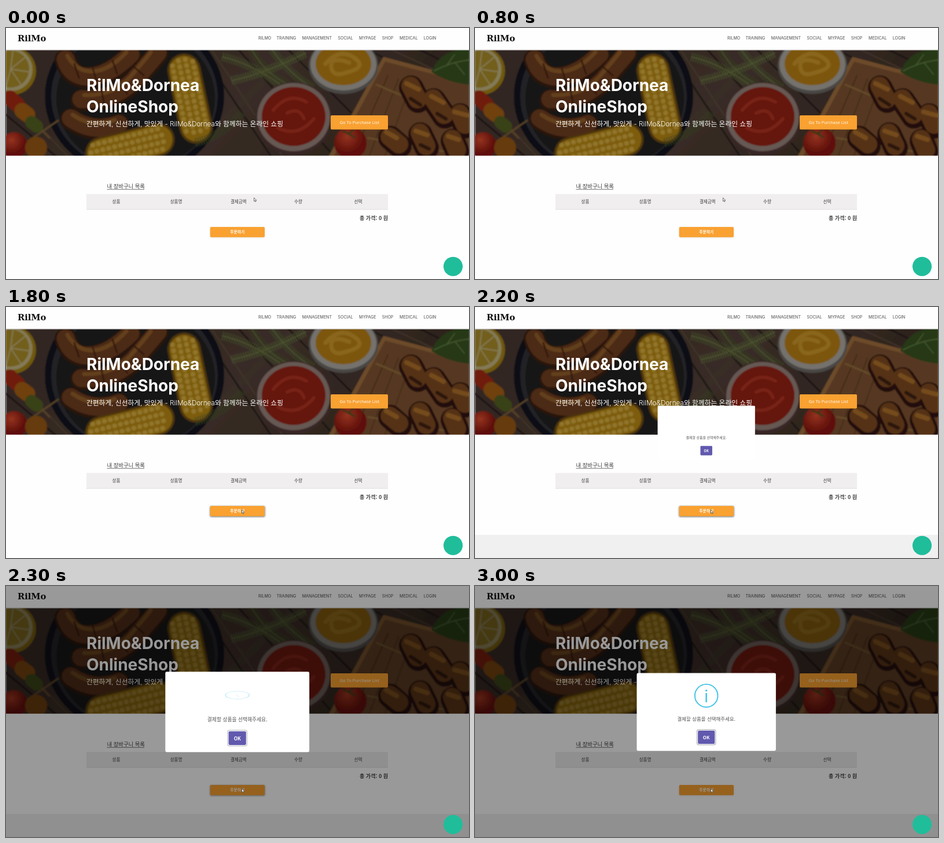
Write an HTML page that moves like this. It is 800x434 px and loops after 3.7 s.

```html
<!DOCTYPE html>
<html lang="ko">
<head>
<meta charset="utf-8">
<title>OnlineShop</title>
<style>
html, body { margin: 0; width: 100%; height: 100%; overflow: hidden; background: #fefefe; }
svg { display: block; }
text { font-family: "Noto Sans CJK KR", "Noto Sans CJK", sans-serif; fill: #3c3c3c; }
.mid { text-anchor: middle; }
.inter, #nav text { font-family: Inter, "Noto Sans CJK KR", "Noto Sans CJK", sans-serif; }
#nav text { font-size: 7px; font-weight: 500; fill: #666; }
#head text { font-size: 7.5px; font-weight: 500; }
.white, #hero text { fill: #fff; }
.line { fill: none; stroke-linecap: round; stroke-linejoin: round; }
</style>
</head>
<body>
<svg width="800" height="434" viewBox="0 0 800 434">
  <defs>
    <clipPath id="frame"><rect y="38.5" width="800" height="182.3"/></clipPath>
    <filter id="soft"><feGaussianBlur stdDeviation="1.4"/></filter>
    <filter id="haze"><feGaussianBlur stdDeviation=".9"/></filter>
    <radialGradient id="tomato" cx=".4" cy=".3"><stop stop-color="#ee5233"/><stop offset="1" stop-color="#98190f"/></radialGradient>
    <linearGradient id="wood" x2="1" y2=".25"><stop stop-color="#4d3c32"/><stop offset=".6" stop-color="#5a483c"/><stop offset="1" stop-color="#45352c"/></linearGradient>
    <g id="cob" class="line">
      <path d="M-50 0H50" stroke="#7c5510" stroke-width="58"/>
      <path d="M-50 0H50" stroke="#c9951c" stroke-width="50"/>
      <path d="M-62 -18H62M-68 -6H68M-68 6H68M-62 18H62" stroke="#e9bd45" stroke-width="8" stroke-dasharray=".5 10"/>
    </g>
  </defs>
  <rect width="800" height="434" fill="#fefefe"/>
  <rect id="footer" y="394" width="800" height="40" fill="#f1f0f0"/>

  <text x="20" y="23" style="font:bold 14.7px 'DejaVu Serif',serif;fill:#111">RilMo</text>
  <g id="nav"></g>
  <rect y="37.6" width="800" height="1" fill="#bbb"/>

  <g clip-path="url(#frame)">
    <g filter="url(#haze)">
      <rect y="30" width="800" height="200" fill="url(#wood)"/>
      <path class="line" d="M330 30L460 225M395 30L570 225M480 30L640 190M0 150L90 225M610 30L700 75M700 30L800 80" stroke="#2f241d" stroke-width="3"/>
      <path class="line" d="M350 30L480 225M520 110L580 170M650 30L800 100M20 130L110 225" stroke="#6a5444" stroke-width="2"/>
      <!-- lemon -->
      <circle cx="10" cy="74" r="42" fill="#b58d1c"/><circle cx="9" cy="72" r="37" fill="#d3c58a"/><circle cx="8" cy="71" r="32" fill="#b9992f"/>
      <path d="M8 71L34 50M8 71L41 76M8 71L26 98M8 71L0 102M8 71L12 39" stroke="#d3c58a" stroke-width="2"/>
      <!-- pan -->
      <ellipse cx="222" cy="118" rx="155" ry="140" fill="#1a1b1d"/>
      <ellipse cx="222" cy="118" rx="144" ry="129" fill="#38393b"/>
      <ellipse cx="224" cy="122" rx="137" ry="122" fill="#202022"/>
      <!-- sausages -->
      <g class="line">
        <path d="M103 55Q112 88 145 86T215 48M130 125Q190 128 225 88T262 45M112 158Q150 185 195 168" stroke="#3f1e10" stroke-width="38"/>
        <path d="M103 54Q112 86 145 84T215 46M130 123Q190 126 225 86T262 43M112 156Q150 183 195 166" stroke="#78421f" stroke-width="31"/>
        <path d="M106 48Q122 76 150 75T208 42M135 116Q186 118 216 83T250 42M115 150Q150 174 188 159" stroke="#a0652f" stroke-width="7"/>
        <path d="M118 62l8 24M150 70l7 23M184 56l8 23M165 108l5 24M195 96l15 18M222 68l16 14" stroke="#4b2411" stroke-width="2.5"/>
      </g>
      <use href="#cob" transform="translate(214 205) rotate(-14)"/>
      <use href="#cob" transform="translate(318 122) rotate(78)"/>
      <!-- vegetable skewers -->
      <g class="line">
        <path d="M-5 108L75 190M0 222L90 160" stroke="#8c6a3c" stroke-width="3"/>
        <path d="M7 121L20 133" stroke="#b52d18" stroke-width="26"/>
        <path d="M28 143L37 150" stroke="#b5681b" stroke-width="27"/>
        <path d="M44 163L53 170" stroke="#5c6b25" stroke-width="22"/>
      </g>
      <circle cx="14" cy="203" r="23" fill="url(#tomato)"/><circle cx="52" cy="207" r="19" fill="#a45f1b"/>
      <!-- rosemary -->
      <g fill="none" stroke-width="15" stroke-dasharray="1.5 2.8">
        <path d="M374 50Q440 65 510 126" stroke="#66793f"/><path d="M425 38Q450 82 490 98" stroke="#4d612f"/>
        <path d="M390 91Q450 78 518 43" stroke="#728348"/><path d="M460 38Q488 78 530 104" stroke="#5e733d"/>
        <path d="M328 198Q375 186 410 145" stroke="#4d612f"/>
      </g>
      <path class="line" d="M374 50Q440 65 510 126M425 38Q450 82 490 98M390 91Q450 78 518 43M460 38Q488 78 530 104" stroke="#80874f" stroke-width="1.5"/>
      <!-- board -->
      <path d="M652 50L810 92V230H555Z" fill="#8a5c33"/><path d="M652 50L810 92V98L655 58L562 230H553Z" fill="#b07a45"/>
      <path class="line" d="M660 82L600 220M678 88L628 220M700 95L655 220" stroke="#6b4321" stroke-width="2"/>
      <!-- sauces -->
      <ellipse cx="583" cy="65" rx="60" ry="49" fill="#77736f"/><ellipse cx="583" cy="63" rx="57" ry="45" fill="#bcb7b0"/><ellipse cx="583" cy="62" rx="48" ry="37" fill="#c98a18"/>
      <path class="line" d="M552 62Q576 34 601 51T588 77Q564 86 562 67T593 60" stroke="#dda52f" stroke-width="7"/>
      <ellipse cx="497" cy="156" rx="66" ry="63" fill="#5b413c"/><ellipse cx="497" cy="154" rx="63" ry="59" fill="#a58d84"/><ellipse cx="497" cy="153" rx="55" ry="51" fill="#a32213"/>
      <path class="line" d="M462 142Q488 110 519 128M470 173Q504 190 532 157M486 147Q507 136 515 157" stroke="#c03a22" stroke-width="6"/>
      <!-- tomato -->
      <circle cx="595" cy="199" r="28" fill="url(#tomato)"/>
      <path class="line" d="M592 183l9-8M592 183l-10-5M592 183l10 6" stroke="#4b5b25" stroke-width="3"/>
      <!-- meat skewers -->
      <g class="line">
        <path d="M640 98L805 168M625 190L805 222" stroke="#a27a45" stroke-width="3"/>
        <path d="M700 103L712 126M739 125L758 153M785 151L794 170M664 190L680 204M716 184L727 207M772 195L780 214" stroke="#35190d" stroke-width="42"/>
        <path d="M699 100L711 123M738 122L757 150M784 148L793 167M663 188L679 201M715 181L726 204M771 192L779 211" stroke="#87501f" stroke-width="32"/>
        <path d="M692 96L713 106M735 118L756 129M775 145L797 151M657 180L675 190M708 178L728 185M764 187L782 193" stroke="#bb7b31" stroke-width="8"/>
        <path d="M699 122l17 11M745 148l15 9M716 202l15 7" stroke="#442010" stroke-width="6"/>
      </g>
      <!-- leaves -->
      <path d="M735 76Q752 32 808 36V98Q770 98 735 76Z" fill="#3c5a29"/>
      <path class="line" d="M740 74Q770 58 804 55M762 64L775 46M776 60L792 80" stroke="#6a8c48" stroke-width="2"/>
      <rect y="30" width="800" height="200" opacity=".38"/>
    </g>
  </g>

  <g id="hero">
    <g font-size="28" font-weight="700">
      <text class="inter" x="139" y="109">RilMo&amp;Dornea</text>
      <text class="inter" x="139" y="145.5">OnlineShop</text>
    </g>
    <text class="inter" x="139" y="170" font-size="11.75" font-weight="300">간편하게, 신선하게, 맛있게 - RilMo&amp;Dornea와 함께하는 온라인 쇼핑</text>
    <rect x="561" y="151" width="99" height="24.5" rx="2" fill="#f9a131"/>
    <text class="mid" x="610.7" y="166" style="font:500 7.5px 'Open Sans',sans-serif">Go To Purchase List</text>
  </g>

  <text x="174.5" y="277.3" font-size="9.35">내 장바구니 목록</text>
  <rect x="174.5" y="278.6" width="64.5" height=".8" fill="#444"/>
  <rect x="139" y="287" width="521" height="27" fill="#f0eeee"/>
  <rect x="139" y="313.4" width="521" height=".8" fill="#dcdada"/>
  <g id="head" class="mid"></g>
  <text x="660" y="331.6" font-size="9" font-weight="700">
    <tspan text-anchor="end">총 가격: 0 원</tspan>
  </text>
  <rect id="shade" x="352.5" y="344.5" width="95" height="18.5" rx="2" fill="#0008" filter="url(#soft)"/>
  <rect x="352.7" y="344" width="94.3" height="17.7" rx="2" fill="#f9a131"/>
  <text class="mid white" x="399.7" y="354.5" font-size="6.8" font-weight="700">주문하기</text>

  <rect id="veil" width="800" height="434"/>
  <g id="modal">
    <rect x="-120.2" y="-67.2" width="240.4" height="134.5" rx="2.4" fill="#fff"/>
    <g id="icon">
      <circle r="19.8" fill="none" stroke="#3fc3e8" stroke-width="1.9"/>
      <text id="mark" class="mid inter" y="11" font-size="28" style="fill:#3fc3e8">i</text>
    </g>
    <text class="mid" y="15.4" font-size="8.45" style="fill:#545454">결제할 상품을 선택해주세요.</text>
    <rect id="ring" x="-16.2" y="30.7" width="32.4" height="26.2" rx="3" fill="none" stroke="#b4b3bd" stroke-width="1.2"/>
    <rect x="-14.6" y="32.3" width="29.2" height="23" rx="2" fill="#6159ae"/>
    <text class="mid white" y="47.3" font-size="8" font-weight="700">OK</text>
  </g>
  <circle cx="772.5" cy="412.3" r="16.6" fill="#20bd9b"/>
  <path id="cursor" d="M0 0V6.2L1.5 4.9L2.5 7L3.5 6.5L2.6 4.5H4.5Z" fill="#eee" stroke="#444" stroke-width=".7"/>
</svg>
<script>
const $ = id => document.getElementById(id);
const LOOP = 3700, STEP = 50, OPEN = 2200;

const labels = (id, y, items) => {
  $(id).innerHTML = items.map(([x, s]) => `<text x="${x}" y="${y}">${s}</text>`).join('');
};
labels('nav', 20.1, [[436, 'RILMO'], [467.5, 'TRAINING'], [511.7, 'MANAGEMENT'], [573.5, 'SOCIAL'],
  [610, 'MYPAGE'], [649.7, 'SHOP'], [680, 'MEDICAL'], [721.8, 'LOGIN']]);
labels('head', 303, [[190.5, '상품'], [294, '상품명'], [401.7, '결제금액'], [505, '수량'], [608.5, '선택']]);

const clamp = v => Math.min(1, Math.max(0, v));
const span = (t, from, to) => clamp((t - from) / (to - from));
const smooth = p => p ** 3 * (p * (6 * p - 15) + 10);

// CSS "ease": cubic-bezier(.25, .1, .25, 1)
function ease(x) {
  if (x <= 0 || x >= 1) return clamp(x);
  const curve = (u, a, b) => 3 * u * (1 - u) ** 2 * a + 3 * u * u * (1 - u) * b + u ** 3;
  let lo = 0, hi = 1;
  for (let i = 0; i < 20; i++) {
    const m = (lo + hi) / 2;
    if (curve(m, .25, .25) < x) lo = m; else hi = m;
  }
  return curve(lo, .1, 1);
}

// Keyframes [time, value], eased within each segment
function keys(t, list) {
  let v = list[0][1];
  for (let i = 1; i < list.length; i++) {
    const [a, from] = list[i - 1], [b, to] = list[i];
    if (t >= a) v = from + (to - from) * ease(span(t, a, b));
  }
  return v;
}

const set = (id, name, value) => $(id).setAttribute(name, value);

function draw(t) {
  const m = t - OPEN, shown = m >= 0 ? 'visible' : 'hidden';

  const move = smooth(span(t, 1250, 1450)), settle = smooth(span(t, 1550, 1700));
  set('cursor', 'transform', `translate(${428.5 - 19 * move - 2 * settle} ${293.5 + 54.5 * move + 2.5 * settle})`);
  set('shade', 'opacity', .15 + .85 * ease(span(t, 1550, 1850)) * (1 - ease(span(m, 50, 250))));

  set('footer', 'visibility', shown);
  set('veil', 'opacity', .4 * ease(span(m, 0, 100)));

  set('modal', 'visibility', shown);
  const size = keys(m, [[0, .7], [135, 1.05], [240, .95], [300, 1]]);
  set('modal', 'transform', `translate(399.7 217.7) scale(${size})`);
  set('ring', 'opacity', ease(span(m, 50, 150)));

  const flip = ease(span(m, 0, 500));
  set('icon', 'opacity', flip);
  set('icon', 'transform', `translate(0 -28) scale(1 ${Math.cos((1 - flip) * 100 * Math.PI / 180)})`);
  set('mark', 'transform', `rotate(${keys(m, [[0, 45], [200, -25], [400, 15], [600, -5], [800, 0]])})`);
  set('mark', 'opacity', keys(m, [[0, 0], [200, .4], [400, .8], [600, 1]]));
}

const start = performance.now();
function tick() {
  // 1 ms of slack keeps clock rounding from falling into the previous step
  const t = (performance.now() - start + 1) % LOOP;
  draw(Math.floor(t / STEP) * STEP);
  requestAnimationFrame(tick);
}
tick();
</script>
</body>
</html>
```
